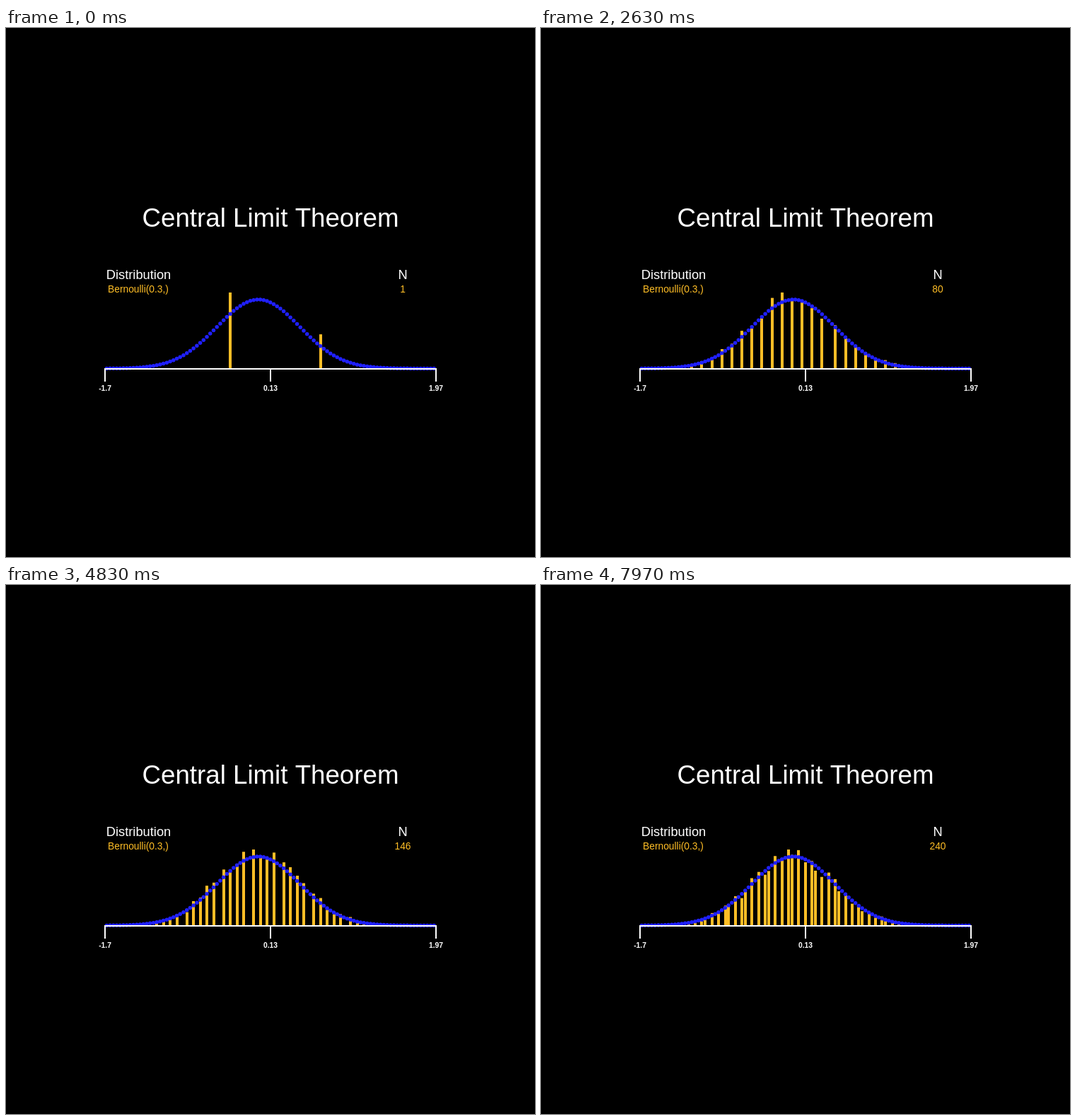
These frames come from a looping animation (748x748 px, 8000 ms). An HTML page with a canvas:

```html
<!DOCTYPE html>
<html lang="en">
<head>
<meta charset="utf-8">
<title>Central Limit Theorem</title>
<style>
  html, body { margin: 0; width: 100%; height: 100%; overflow: hidden; background: #000; }
  canvas { display: block; }
</style>
</head>
<body>
<canvas width="748" height="748"></canvas>
<script>
const ctx = document.querySelector('canvas').getContext('2d');
const LOOP = 8000, P = 0.3, SAMPLES = 4000;
const SIGMA = Math.sqrt(P * (1 - P));
const BINS = 99, LO = -1.701, BIN = 8 * SIGMA / BINS;
const LEFT = 140, RIGHT = 607.5, STEP = (RIGHT - LEFT) / BINS;
const BASE = 481.5, BAR_MAX = 107.5, CURVE_MAX = 97.5;
const GOLD = '#ffbe26', BLUE = '#2020ff', WHITE = '#fff';

const binX = bin => LEFT + (bin + 0.5) * STEP;

function text(string, x, y, size, color = WHITE, weight = '') {
  ctx.font = `${weight} ${size}px "Liberation Sans", Arial, sans-serif`;
  ctx.textAlign = 'center';
  ctx.fillStyle = color;
  ctx.fillText(string, x, y);
}

// Repeatable sampling error with unit variance.
const noise = (n, k) =>
  Math.SQRT2 * Math.sin(2.4 * n * n + 1.442 * k * k + 1.7 * n * k - 3.97);

// Sampled binomial frequencies of sqrt(n) * (mean - P), one per occupied bin.
function histogram(n) {
  const bars = [];
  let prob = (1 - P) ** n;
  for (let k = 0; k <= n; k++) {
    const error = noise(n, k) * Math.sqrt(prob * (1 - prob) / SAMPLES);
    const count = Math.round((prob + error) * SAMPLES);
    const bin = Math.floor(((k - n * P) / Math.sqrt(n) - LO) / BIN);
    if (count > 0) bars.push({ bin, count });
    prob *= (n - k) / (k + 1) * P / (1 - P);
  }
  return bars;
}

function drawBars(n) {
  const bars = histogram(n);
  const most = Math.max(...bars.map(bar => bar.count));
  ctx.fillStyle = GOLD;
  for (const { bin, count } of bars) {
    const height = BAR_MAX * count / most;
    ctx.fillRect(Math.round(binX(bin) - 1.9), BASE - height, 4, height);
  }
}

function drawCurve() {
  ctx.fillStyle = BLUE;
  for (let bin = 0; bin < BINS; bin++) {
    const z = (LO + (bin + 0.5) * BIN) / SIGMA;
    ctx.beginPath();
    ctx.arc(binX(bin), BASE - CURVE_MAX * Math.exp(-z * z / 2), 2.75, 0, 2 * Math.PI);
    ctx.fill();
  }
}

function drawAxis() {
  ctx.fillStyle = WHITE;
  ctx.fillRect(139, 481, 470, 2);
  [[140, '-1.7'], [374, '0.13'], [608, '1.97']].forEach(([x, label]) => {
    ctx.fillStyle = WHITE;
    ctx.fillRect(x - 1, 481, 2, 19);
    text(label, x, 512.5, 10.3, WHITE, 'bold');
  });
}

function draw(n) {
  ctx.fillStyle = '#000';
  ctx.fillRect(0, 0, 748, 748);
  text('Central Limit Theorem', 374, 281, 36.7);
  text('Distribution', 187.5, 355, 18.3);
  text('Bernoulli(0.3,)', 187, 374, 13.8, GOLD);
  text('N', 561, 355, 18.3);
  text(n, 561, 374, 13.8, GOLD);
  drawBars(n);
  drawCurve();
  drawAxis();
}

// Thirty steps a second, with starts rounded to 10 ms.
function sampleSize(ms) {
  const rest = ms % 100;
  return 1 + 3 * Math.floor(ms / 100) + (rest >= 30) + (rest >= 70);
}

let shown = 0;
function tick() {
  const n = sampleSize(performance.now() % LOOP);
  if (n !== shown) draw(shown = n);
  requestAnimationFrame(tick);
}
tick();
</script>
</body>
</html>
```
